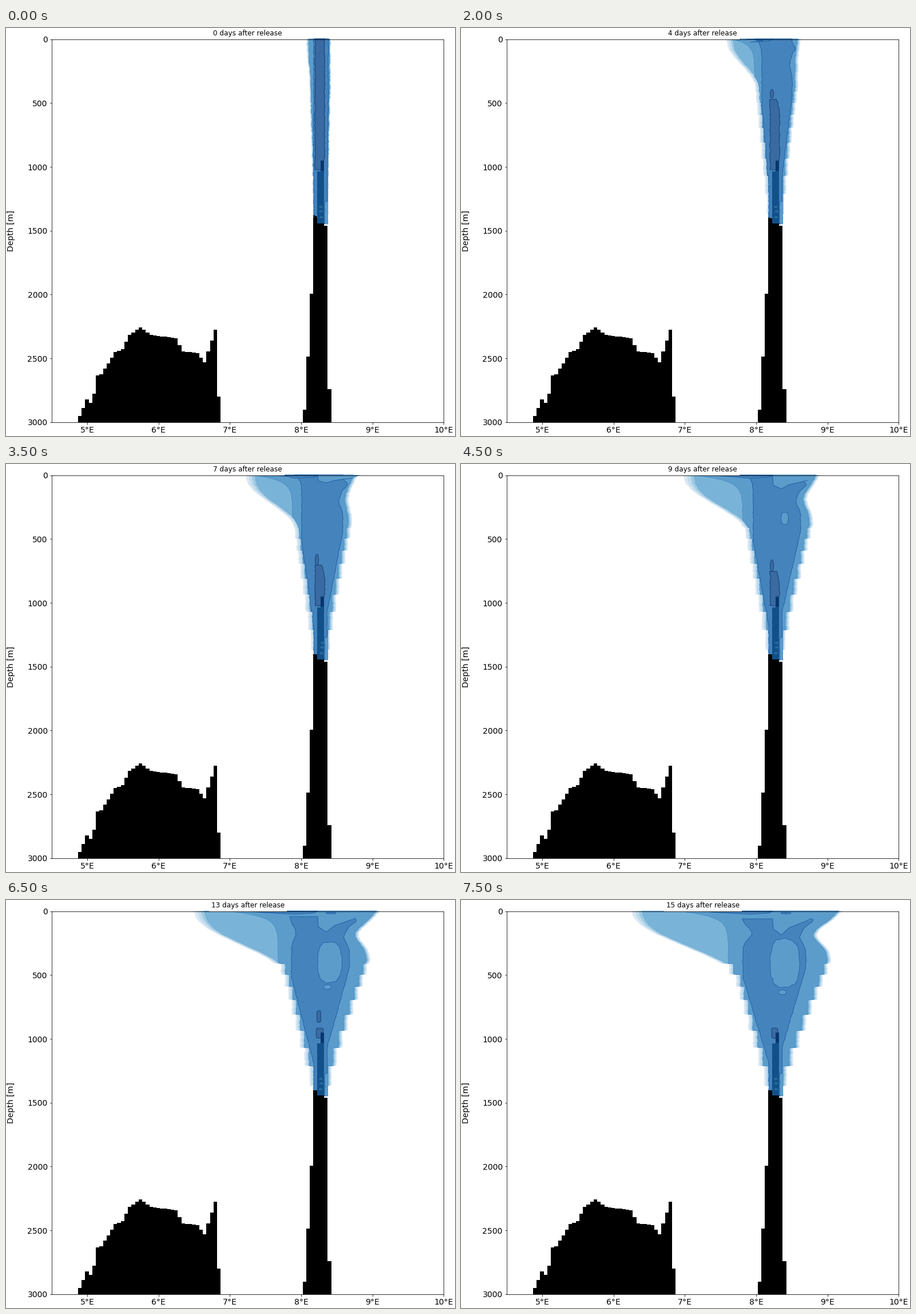
Recreate the animation shown at these times as a matplotlib script. Size 785x714 px, loop 8 s.

```python
import numpy as np
import matplotlib.pyplot as plt
from matplotlib.animation import FuncAnimation
from matplotlib.patches import Polygon, Rectangle

W, H = 785, 714
LEFT, RIGHT, TOP, BOTTOM = 79.7, 765.3, 19.7, 689.9
CELL = 6.235                      # width of one model column
HILL_X, RIDGE_X = 125.9, 518.7
WALL_L, WALL_R = 537.4, 562.8     # sides of the ridge the plume sits on

# Sea floor of the wide hill: (column, top)
HILL = [(0, 680), (2, 651), (3, 657), (4, 641), (5, 609), (6, 607), (10, 568),
        (12, 563), (14, 538), (17, 525), (20, 538), (27, 544), (29, 567),
        (33, 570), (35, 586), (38, 529), (39, 646)]
RIDGE = [668, 575, 465, 333, 342, 342, 346, 632]

YS = np.arange(19, 344.0)
# Layers thicken with depth; below the first bound edges move in steps
j = np.arange(10)
BOUNDS = 112 + 17.5 * j + 1.15 * j ** 2
layer = np.clip(np.searchsorted(BOUNDS, YS, side="right") - 1, 0, 8)
STEPS = np.where(YS < BOUNDS[0], YS, (BOUNDS[layer] + BOUNDS[layer + 1]) / 2)

blues = plt.get_cmap("Blues")
BASE = [np.array(blues(0.2 + 0.12 * k)[:3]) for k in range(7)]
FILL = [0.8 * c + 0.2 for c in BASE]    # over white
SHADE = [0.8 * c for c in BASE]         # over the black sea floor
LINE = [None, None, None, "#6fabd5", "#3b83c0", "#1c5da4", "#123a6b"]

plt.rcParams["font.family"] = "DejaVu Sans"
fig = plt.figure(figsize=((W + 0.001) / 72, (H + 0.001) / 72), dpi=72, facecolor="white")
ax = fig.add_axes([0, 0, 1, 1])
ax.set_xlim(0, W)
ax.set_ylim(H, 0)
ax.axis("off")

frame = fig.add_axes([LEFT / W, 1 - BOTTOM / H, (RIGHT - LEFT) / W, (BOTTOM - TOP) / H],
                     facecolor="none", zorder=5)
frame.set_xlim(4.5, 10)
frame.set_ylim(3000, 0)
frame.set_xticks(range(5, 11), [f"{d}°E" for d in range(5, 11)])
frame.set_yticks(range(0, 3001, 500))
frame.tick_params(labelsize=14)
fig.text(13 / W, 1 - 355 / H, "Depth [m]", size=14, rotation=90,
         rotation_mode="anchor", ha="center", va="baseline")
title = frame.text(422.7, 13, "", size=12, ha="center", va="baseline", zorder=10,
                   transform=ax.transData, bbox=dict(fc="white", ec="none", pad=4))
live = []


def bar(x, top, bottom=BOTTOM, color="black", z=5):
    ax.add_patch(Rectangle((x, top), CELL, bottom - top, fc=color, lw=0,
                           zorder=z, antialiased=False))


def draw_floor():
    for i, top in enumerate(np.interp(range(40), *zip(*HILL))):
        bar(HILL_X + i * CELL, round(top) - 0.6)
    for i, top in enumerate(RIDGE):
        bar(RIDGE_X + i * CELL, top)
    # Peaks seen through the plume
    bar(RIDGE_X + 4 * CELL, 251, 342, SHADE[5], 4)
    bar(RIDGE_X + 5 * CELL, 232, 342, SHADE[5], 4)
    bar(RIDGE_X + 5 * CELL, 232, 250, SHADE[6], 4.1)


draw_floor()


def bell(y, mid, width):
    return np.exp(-((y - mid) / width) ** 2)


def fade(y, length):
    return np.exp(-(y - 19) / length)


def wobble(rng, amp):
    knots = np.arange(19, 347, 3.0)
    return np.interp(YS, knots, rng.uniform(-amp, amp, len(knots)))


def outer_left(day):
    """Linear spread at depth plus a surface current running west."""
    y = STEPS
    t = np.clip((y - 26) / (65 + 3 * day), 0, 1)
    surge = (3 + 9.6 * day) * (1 + np.cos(np.pi * t)) / 2
    return WALL_L - (0.03 + 0.0175 * day) * np.maximum(334 - y, 0) - surge


def outer_right(day):
    """Bulge around 400 m, a notch above it and a thin surface tongue."""
    y = STEPS
    v = np.clip((334 - y) / 229, 0, 1)
    return (WALL_R + (5 + 5.3 * day) * v ** 1.15 + (1.4 * day) * fade(y, 22)
            - max(0, 2.5 * (day - 4)) * bell(y, 60, 22))


def middle_left(day, outer, scale):
    cap = 1.12 * (0.03 + 0.0175 * day) * 214
    flare = 90 * min(day / 9, 1) * fade(YS, 10)
    return np.minimum(np.maximum(outer + 8 * scale, WALL_L - cap - flare), WALL_L + 0.6)


def inner_left(day):
    taper = np.clip((285 - YS) / 150, 0, 1)
    waist = 4 * max(0, day - 11) * bell(YS, 58, 14)
    flare = 12 * min(day / 2, 1) * fade(YS, 8)
    return 538 - 3 * day * taper - flare + waist


def inner_right(day):
    reach = 2 + 45 * np.tanh(day / 11)
    taper = np.clip((258 - YS) / 140, 0, 1)
    shape = taper - 0.25 * bell(YS, 65, 14) + 0.3 * bell(YS, 36, 7)
    return 561.5 + reach * shape - 4.5 * (YS > 303)


def blob(pts, level, z, line=None, lw=0.8):
    patch = Polygon(pts, closed=True, fc=FILL[level], ec=line or "none",
                    lw=lw if line else 0, zorder=z, joinstyle="round")
    live.append(ax.add_patch(patch))
    return patch


def band(left, right, level, z, top=19, bottom=344):
    k = (YS >= top) & (YS <= bottom)
    edge = np.concatenate([left[k], right[k][::-1]])
    pts = np.column_stack([edge, np.concatenate([YS[k], YS[k][::-1]])])
    blob(pts, level, z, LINE[level], 0.9 if level > 4 else 0.6)


def oval(cx, cy, rx, ry, level, z, rng, power=1.0, line=LINE[5]):
    a = np.linspace(0, 2 * np.pi, 40, endpoint=False)
    r = rng.uniform(0.96, 1.04, 40)
    c, s = np.cos(a), np.sin(a)
    return blob(np.column_stack([cx + rx * r * np.sign(c) * abs(c) ** power,
                                 cy + ry * r * np.sign(s) * abs(s) ** power]), level, z, line)


def draw_core(day, rng):
    """Most concentrated water, shrinking towards the sea floor."""
    z, line = 2.9, LINE[6]
    top = 19 + 176 * (1 - np.exp(-max(0, day - 2) / 2.2))
    if day < 10:
        near = min(day / 2, 1) * np.clip((45 - YS) / 25, 0, 1)
        left = 540.5 + wobble(rng, 0.9) - 13 * near ** 2
        right = 557 + wobble(rng, 0.9) - 16 * near - 7 * np.clip((YS - 228) / 20, 0, 1)
        if day > 2:
            right -= 5 * np.clip((top + 22 - YS) / 22, 0, 1)
            oval(543.5, top - 9, 3, 5 + 0.7 * day, 6, z, rng, line=line)
        band(left, right, 6, z, top, 248)
    else:
        if day < 15:
            oval(547, (top + 214) / 2, 6 - 0.8 * (day - 10), (214 - top) / 2, 6, z, rng, 0.5, line)
        oval(548.5, 233, 7.5 - 0.4 * (day - 10), 9, 6, z, rng, 0.4, line)


def draw_holes(day, rng):
    """Diluted water: a bite from the surface and a growing pocket."""
    z = 2.6
    if day > 6:
        top = 19.5 + max(0, 2 * (day - 8))
        x = np.array([545, 546, 560, 574, 590, 606])
        y = 19 + 14 * np.sqrt(day - 6) * np.array([0, 0.75, 1, 0.7, 0.55, 0.4])
        y[0] = min(top, y[1])
        blob(list(zip(x, y)) + [(620, 19.5), (545, 19.5)], 4, z)
        live.extend(ax.plot(x, y, color=LINE[5], lw=0.9, zorder=z + 0.01))
    if day > 8:
        grow = np.sqrt(day - 8.6)
        oval(566, 95 + min(15, 3.5 * (day - 9)), 10 * grow, 17 * grow, 4, z, rng, 0.75)
    if day > 9:
        oval(562, 138 + 4.7 * (day - 10), 7, 4, 4, z, rng)
        oval(568, 23, 9, 1.2, 5, z + 0.1, rng)


def draw_foot(day, rng):
    """Ragged lower end over the sea floor."""
    for y in (313, 321, 331):
        patch = oval(552 + rng.uniform(-2, 2), y, 3.5, 2, 4, 4.2, rng, line=None)
        patch.set_facecolor(SHADE[4])
    y = 327 + min(day, 6)
    x = RIDGE_X + 3 * CELL
    blob([(x, y), (x + CELL, y + 3), (x + CELL, 350), (x, 350)], 6, 5).set_facecolor("black")


def draw_plume(day):
    rng = np.random.default_rng(40 + day)
    scale = min(1, 0.35 + 0.13 * day)
    spread = 1 + min(day / 9, 1) * np.clip((60 - YS) / 30, 0, 1)
    left = outer_left(day) + wobble(rng, 0.7)
    right = outer_right(day) + wobble(rng, 0.7)
    middle = middle_left(day, left, scale) + wobble(rng, 0.5)
    for k in range(5):
        edge = middle if k == 4 else np.minimum(left + 3 * k * scale * spread, middle)
        band(edge, np.maximum(right - 1.8 * k * scale, np.minimum(right, WALL_R)),
             k, 2 + 0.1 * k)

    core_l = np.maximum(inner_left(day) + wobble(rng, 0.6), middle)
    band(core_l, inner_right(day) + wobble(rng, 0.6), 5, 2.5, 19 + max(0, 2 * (day - 8)))
    if day > 3:
        tip = max(420, 487 - 12 * (day - 5))
        blob([(tip, 19.5), (tip + 30, 22), (505, 25), (538, 23), (545, 19.5)], 5, 2.55, LINE[5])
    draw_holes(day, rng)
    draw_core(day, rng)
    draw_foot(day, rng)


def update(day):
    while live:
        live.pop().remove()
    title.set_text(f"{day} days after release")
    draw_plume(day)
    return []


anim = FuncAnimation(fig, update, frames=16, interval=500, init_func=lambda: [],
                     repeat=True, repeat_delay=0, blit=False)
plt.show()
```
